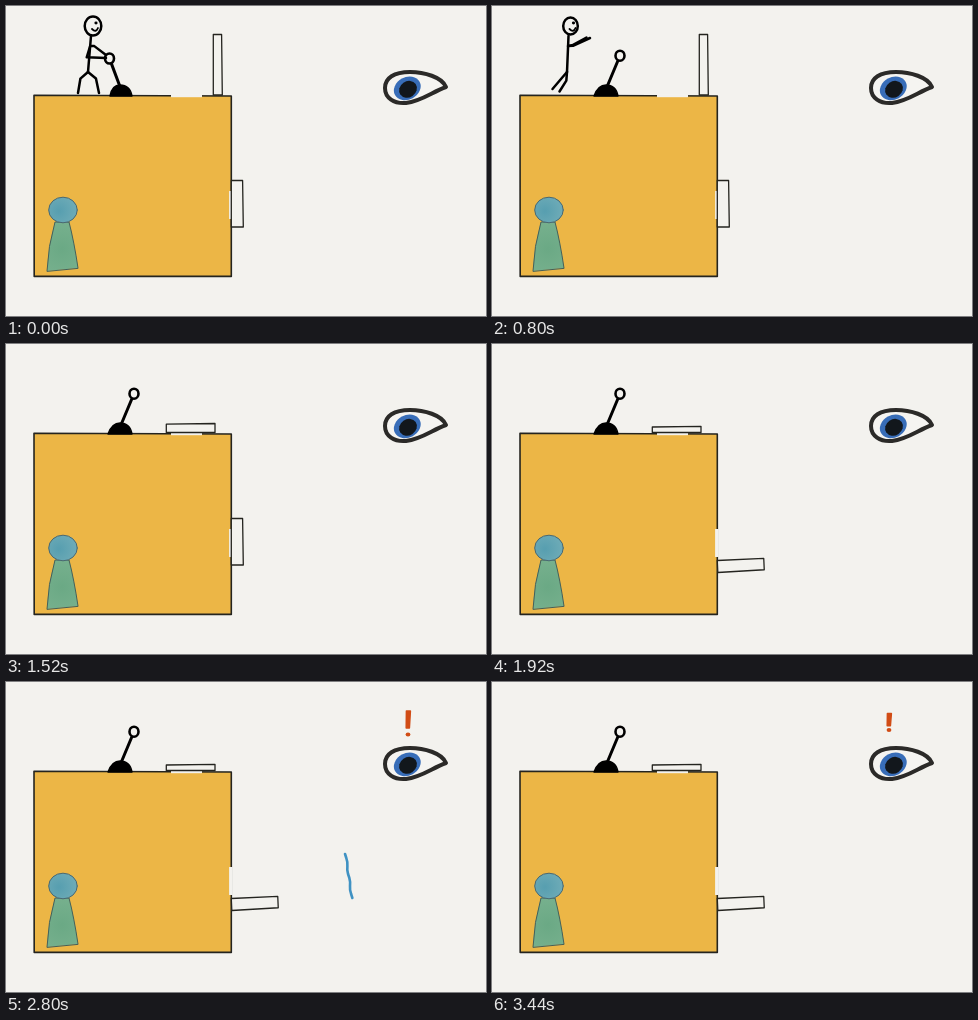
Animation of 480 by 310 pixels, one loop 3.52 s. Source, as an HTML page with a canvas:

```html
<!DOCTYPE html>
<html lang="en">
<head>
<meta charset="utf-8">
<title>Lever, box and eye</title>
<style>
html, body { margin: 0; width: 100%; height: 100%; overflow: hidden; background: #f3f2ee; }
canvas { display: block; }
</style>
</head>
<body>
<canvas id="stage" width="480" height="310"></canvas>
<script>
const LOOP = 3520, STEP = 80;
const PAPER = '#f3f2ee', INK = '#24241f', BLACK = '#000';
const ctx = document.getElementById('stage').getContext('2d');
ctx.lineJoin = 'round';

const mix = (a, b, p) => a + (b - a) * p;
const mixAll = (a, b, p) => a.map((v, i) => mix(v, b[i], p));
const part = (t, from, to) => Math.min(1, Math.max(0, (t - from) / (to - from)));
const ease = p => p * p * (3 - 2 * p);

function paint(path, width, color, fill) {
  if (fill) { ctx.fillStyle = fill; ctx.fill(path); }
  if (width) { ctx.lineWidth = width; ctx.strokeStyle = color; ctx.stroke(path); }
}

const draw = (d, width, color, fill) => paint(new Path2D(d), width, color, fill);

function oval(x, y, rx, ry, width, color, fill, tilt = 0) {
  const path = new Path2D();
  path.ellipse(x, y, rx, ry, tilt, 0, 7);
  paint(path, width, color, fill);
}

function line(points, width, color) {
  draw('M' + points.join('L'), width, color);
}

function wash(x, y, r, inner, outer) {
  const g = ctx.createRadialGradient(x, y, 1, x, y, r);
  g.addColorStop(0, inner);
  g.addColorStop(1, outer);
  return g;
}

function box() {
  draw('M28 89.2L225.3 90V270.4H28.2Z', 1.6, INK, '#ecb646');
  draw('M41 265Q42 240 49 216H63Q68 235 72 262Z', 1, '#44605a',
    wash(56, 243, 26, '#6ba985', '#76b08d'));
  oval(57, 204, 14.3, 12.8, 1, '#4a6870', wash(53, 205, 16, '#589fb0', '#6caab6'));
  // openings behind the lids
  ctx.lineCap = 'butt';
  line([[165, 90], [196, 90]], 2.4, PAPER);
  line([[224.8, 185], [224.8, 213]], 3.4, PAPER);
  ctx.lineCap = 'round';
}

// A lid hinged at its lower left corner
function lid(x, y, width, length, angle) {
  ctx.save();
  ctx.translate(x, y);
  ctx.rotate(angle * Math.PI / 180);
  draw(`M0 0V${-length}H${width - 0.7}L${width} 0Z`, 1.3, INK, PAPER);
  ctx.restore();
}

function lids(t) {
  const top = part(t, 1120, 1520) ** 2, settle = part(t, 1520, 1600);
  lid(mix(207.3, 209, top), mix(89, 88.5, top), mix(9, 6.2, settle), mix(60.5, 48.7, top), -90 * top);
  const side = part(t, 1600, 1920) ** 2;
  lid(225.3, mix(221, 216.5, side), 12, 46.5, 87.5 * side);
}

function lever(p) {
  const x = mix(103.5, 128, p), y = mix(52.5, 49.7, p);
  const dx = 114.5 - x, dy = 82 - y, d = Math.hypot(dx, dy);
  line([[x + dx / d * 6, y + dy / d * 6], [114.5, 82]], 3, BLACK);
  oval(x, y, 4.5, 5, 2.6, BLACK);
  draw(`M${mix(104, 102, p)} 90Q106 79 114 79Q124 79 126 90Z`, 1.4, BLACK, BLACK);
}

// Key poses; bends push out the knees, then the elbows
const stand = { head: [87, 20], hip: [82, 66], feet: [72, 87, 93, 87], hands: [100, 52, 100, 49], bends: [4, -4, 11, -2] };
const lean = { head: [98, 20], hip: [94, 67], feet: [75, 84, 80, 89], hands: [124, 45, 123, 50], bends: [-3, -4, -1, 0] };
const cheer = { head: [59, 20], hip: [56, 65], feet: [46, 82, 55, 82], hands: [72, 19, 66, 13], bends: [3, -1, 4, 2] };

function blend(a, b, p) {
  return Object.fromEntries(Object.keys(a).map(k => [k, mixAll(a[k], b[k], p)]));
}

function limb(from, to, at, bend) {
  const [dx, dy] = [to[0] - from[0], to[1] - from[1]], d = Math.hypot(dx, dy);
  const joint = [from[0] + dx * at - dy / d * bend, from[1] + dy * at + dx / d * bend];
  line([from, joint, to], 2.5, BLACK);
}

function man(t, push) {
  if (t >= 1120) return;
  const away = part(t, 560, 1040);
  const { head: [x, y], hip, feet, hands, bends } = away ? blend(lean, cheer, away) : blend(stand, lean, push);
  const neck = [x - 2, y + 10], shoulder = mixAll(neck, hip, 0.28);
  const swing = 6 * Math.sin(away * Math.PI * 4);
  ctx.save();
  ctx.translate(0, -6 * Math.sin(away * Math.PI * 2) ** 2);
  oval(x, y, mix(8.3, 6.3, away), mix(9.6, 7.5, away), 2.5, BLACK);
  oval(x + 3, y - 3, 1.6, 1.4, 0, '', BLACK);
  draw(`M${x - 1} ${y + 3}q4 4 6 -1`, 1.8, BLACK);
  line([neck, hip], 2.5, BLACK);
  for (const i of [0, 1]) {
    const [fx, fy] = feet.slice(i * 2);
    limb(hip, [fx + (i ? -swing : swing), fy], 0.4, bends[i]);
    limb(shoulder, hands.slice(i * 2, i * 2 + 2), 0.2, bends[i + 2]);
  }
  ctx.restore();
}

function eye() {
  draw('M440 81C436 71 418 66 404 66C388 66 379 72 379 82C379 92 388 98 400 97C416 95 426 86 440 81Z',
    4, '#2b2a28', '#f5f4f1');
  oval(401.3, 82.4, 14, 11.2, 0, '', '#386db8', -0.5);
  oval(402, 83.3, 9.3, 8, 0, '', '#12171c', -0.6);
}

function wave(t) {
  if (t < 2240 || t > 3360) return;
  const age = t - 2800, size = 1 + age / 1500;
  const x = 342.7 + age * 0.19, y = 194 - Math.max(0, age) / 70;
  const points = [];
  for (let k = -22; k <= 22; k += 4) {
    points.push([x + size * (k / 7 + 0.6 * Math.sin(k / 3)), y + k * size]);
  }
  line(points, 2.6, '#3f92c3');
}

function alarm(t) {
  if (t < 2560) return;
  const shrink = ease(part(t, 3120, 3440));
  const grown = mix(mix(40, 29, part(t, 2560, 2800)), 5, ease(part(t, 2800, 3120)));
  const top = mix(grown, 31.5, shrink), foot = mix(54, 49.5, shrink), x = mix(402, 397, shrink);
  const bar = mix(top, foot, 0.68), red = '#d14c15';
  draw(`M${x - 1.6} ${top}h4L${x + 1.4} ${bar}h-3.2Z`, 1.5, red, red);
  oval(x, foot - 1.5, 2.4, 2, 0, '', red);
}

function scene(now) {
  const t = Math.floor(now % LOOP / STEP) * STEP;
  const push = ease(part(t, 0, 480));
  ctx.fillStyle = PAPER;
  ctx.fillRect(0, 0, 480, 310);
  box();
  lids(t);
  lever(push);
  man(t, push);
  eye();
  wave(t);
  alarm(t);
}

const start = performance.now();
function tick() {
  scene(performance.now() - start);
  requestAnimationFrame(tick);
}
tick();
</script>
</body>
</html>
```
